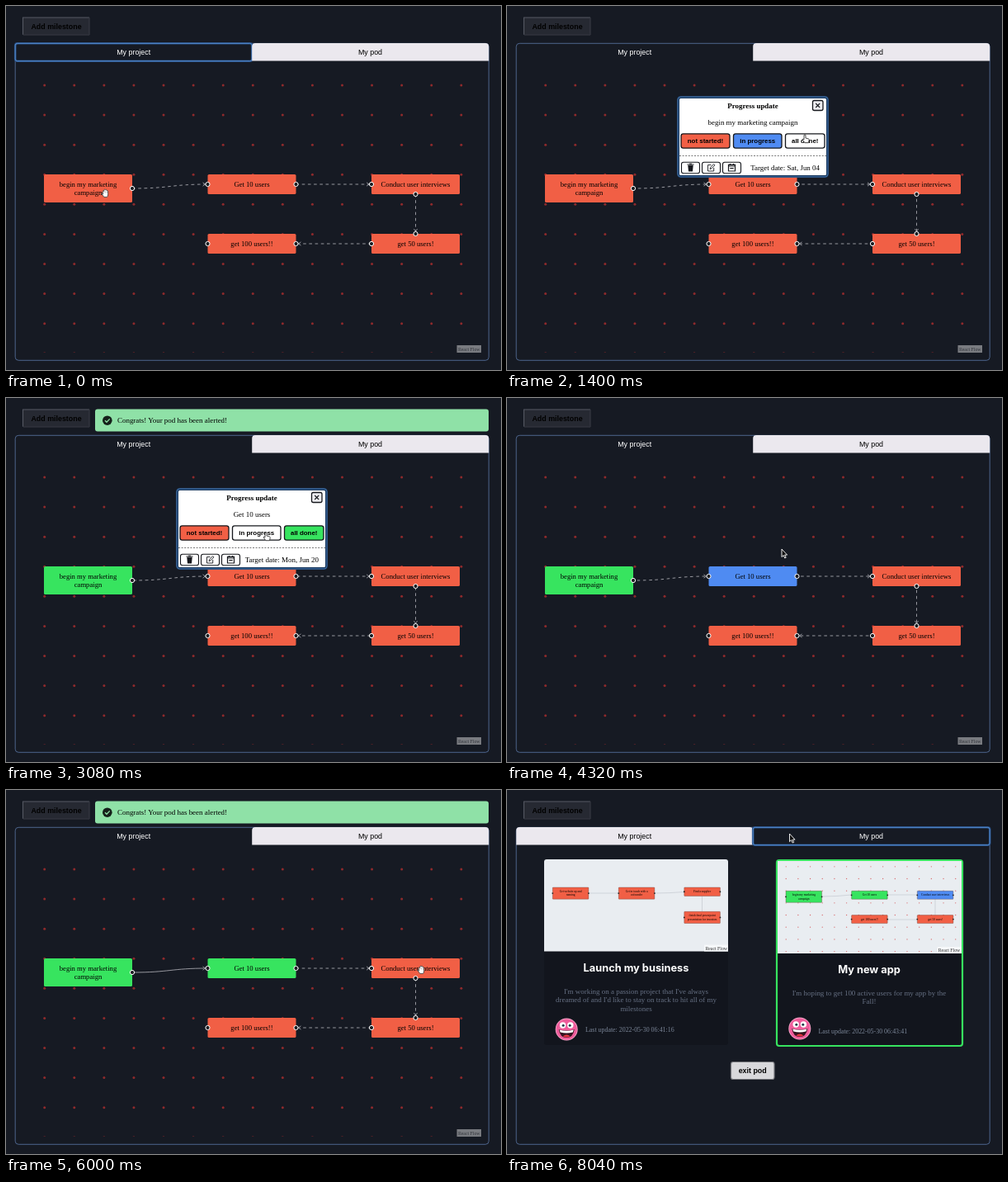
These frames come from a looping animation (600 px wide and 441 px high, 8080 ms). An HTML page:

```html
<!DOCTYPE html>
<html lang="en">
<head>
<meta charset="utf-8">
<title>Milestones</title>
<style>
  html, body { margin: 0; width: 100%; height: 100%; overflow: hidden; background: #161a23; }
  svg { display: block; width: 600px; height: 441px; }
  text { font-family: "Liberation Serif", "Times New Roman", serif; font-size: 8.95px; white-space: pre; }
  .ui { font-family: "Liberation Sans", Arial, sans-serif; font-size: 8.9px; }
  .bold { font-weight: 700; }
  .mid { text-anchor: middle; }
  .end { text-anchor: end; }
  .small { font-size: 7.9px; }
  .label { font-size: 8.65px; }
  .head { font: 700 12.8px Inter, sans-serif; fill: #fff; }
  .tiny { font-size: 3.5px; }
  .credit { font-size: 5.8px; }
  .dim { fill: #667083; }
</style>
</head>
<body>
<svg id="stage" viewBox="0 0 600 441" xmlns="http://www.w3.org/2000/svg"></svg>
<script>
const LOOP = 8080;
const RED = '#f15f45', GREEN = '#37e45f', BLUE = '#4f8bf2', LIGHT = '#ebe8ee';

const text = (x, y, s, cls = '', fill = '#000', id = '') =>
  `<text x="${x}" y="${y}" class="${cls}" fill="${fill}" id="${id}">${s}</text>`;
const rect = (x, y, w, h, fill, extra = '') =>
  `<rect x="${x}" y="${y}" width="${w}" height="${h}" fill="${fill}" ${extra}/>`;
const circle = (x, y, r, fill, extra = '') =>
  `<circle cx="${x}" cy="${y}" r="${r}" fill="${fill}" ${extra}/>`;
const path = (d, extra = '') => `<path d="${d}" ${extra}/>`;
const group = (id, body, extra = '') => `<g id="${id}" ${extra}>${body}</g>`;
const line = (color, width = 1) => `fill="none" stroke="${color}" stroke-width="${width}"`;

const NODES = [
  { x: 46, y: 204, h: 34, lines: ['begin my marketing', 'campaign'] },
  { x: 244.5, y: 204, h: 24, lines: ['Get 10 users'] },
  { x: 443, y: 204, h: 24, lines: ['Conduct user interviews'] },
  { x: 443, y: 276, h: 24, lines: ['get 50 users!'] },
  { x: 244.5, y: 276, h: 24, lines: ['get 100 users!!'] }
];
const EDGES = [
  'M153 221C199 221 199 216 244.5 216', 'M351.5 216H443',
  'M496.5 228V276', 'M443 288H351.5'
];
const HANDLES = [[153, 221], [244.5, 216], [351.5, 216], [443, 216], [496.5, 228],
  [496.5, 276], [443, 288], [351.5, 288], [244.5, 288]];
const BUTTONS = [
  { x: 211, w: 59, label: 'not started!', color: RED },
  { x: 274.5, w: 58.5, label: 'in progress', color: BLUE },
  { x: 337.5, w: 47.5, label: 'all done!', color: GREEN }
];

function dots(x0, y0, cols, rows, gap, r, color) {
  let s = '';
  for (let j = 0; j < rows; j++)
    for (let i = 0; i < cols; i++)
      s += circle(x0 + gap * i, y0 + gap * j, r, color);
  return s;
}

function tab(id, x, label, cx) {
  const d = `M${x} 66.5V49q0-4 4-4h279q4 0 4 4V66.5Z`;
  return path(d, `id="${id}Fill" fill="${LIGHT}"`) +
    text(cx, 59, label, 'ui mid', '#fff', id + 'Text') +
    group(id + 'Ring', `<rect x="${x}" y="45.3" width="287" height="21.4" rx="2.5" ${line('#274d80', 2.6)}/>` +
      `<rect x="${x}" y="45.3" width="287" height="21.4" rx="2.5" ${line('#5b93d8', .9)}/>`);
}

function board() {
  let s = dots(46.7, 96, 15, 9, 36.08, 1.5, '#8f2a2c');
  for (let i = 0; i < 15; i++) s += rect(45.6 + 36.08 * i, 419, 2.2, 1, '#4a2026');
  EDGES.forEach((d, i) => s += path(d, `id="edge${i}" ${line('#b6b7bd', .8)}`));
  s += path('M238.5 213.8l3 2.2-3 2.2M437 213.8l3 2.2-3 2.2M494.3 270l2.2 3 2.2-3M357.5 285.8l-3 2.2 3 2.2', line('#b6b7bd', .7));
  NODES.forEach((n, i) => {
    s += rect(n.x, n.y, 107, n.h, RED, `rx="1.6" id="node${i}"`);
    n.lines.forEach((l, k) => s += text(n.x + 53.5, n.y + 15 + 10.4 * k, l, 'label mid'));
  });
  HANDLES.forEach(([x, y]) => s += circle(x, y, 2.6, '#1b1c20', 'stroke="#fff" stroke-width="1"'));
  return s + rect(546.5, 411, 29.5, 9, '#797b80') + text(561.2, 417.6, 'React Flow', 'credit mid', '#33363c');
}

function popup() {
  const ink = '#16181d';
  let s = rect(207.5, 110.5, 181, 96, '#fff', 'rx="3" stroke="#1d3d63" stroke-width="3"') +
    `<rect x="207" y="110" width="182" height="97" rx="3.5" ${line('#4c7db8', .8)}/>` +
    text(298, 124, 'Progress update', 'bold mid') + text(298, 143.5, '', 'mid', '#000', 'task') +
    rect(370.5, 114.5, 12.5, 12, '#ededf0', `rx="2" stroke="${ink}" stroke-width="1.3"`) +
    path('M374.2 118l5 5m0-5l-5 5', line(ink, 1.1));
  BUTTONS.forEach((b, i) => s += rect(b.x, 154.8, b.w, 17.4, b.color, `rx="2.6" stroke="${ink}" stroke-width="1.3" id="btn${i}"`) +
    text(b.x + b.w / 2, 166.3, b.label, 'ui small bold mid'));
  s += path('M209 181.5H387', line('#555', .8) + ' stroke-dasharray="2 1.6"');
  [211.5, 236.5, 261.5].forEach(x => s += rect(x, 189.3, 22, 13.4, '#fff', `rx="2.5" stroke="${ink}" stroke-width="1.1"`));
  s += path('M219.3 193h6.4l-.7 7.5h-5zM218.5 191.6h8v1h-8zM221 190.8h3v1h-3z', `fill="${ink}"`) +
    path('M247.5 192.6h-4v7.4h7.2v-4M246 197.6l.6-2 4-4 1.3 1.3-4 4z', line(ink, .9)) +
    path('M268.5 192.4h8v7.6h-8zM268.5 194h8M270.5 191v2M274.5 191v2', line(ink, 1.2)) +
    rect(270.3, 196, 4.4, 1.2, ink);
  return s + text(379, 198.8, '', 'end', '#000', 'due');
}

function avatar(x, y) {
  return group('', circle(0, 0, 13.5, '#f7a5c9') + circle(0, 0, 12.6, '#ef5c9b') +
    circle(-4.6, -5, 3.7, '#fff') + circle(4.6, -5, 3.7, '#fff') +
    circle(-4, -4.8, 1.5, '#243a4a') + circle(4, -4.8, 1.5, '#243a4a') +
    path('M-9.5 0Q0 3 9.5 0Q8 10 0 10Q-8 10-9.5 0Z', 'fill="#35141f"') +
    path('M-8.6 .4Q0 3 8.6 .4L7.6 3.4Q0 5.4-7.6 3.4Z', 'fill="#fff"') +
    path('M-4.5 8.5Q0 4.6 4.5 8.5Q0 10.6-4.5 8.5Z', 'fill="#e5353f"'),
    `transform="translate(${x} ${y})"`);
}

function mini(x, y, h, color, lines) {
  const top = y + h / 2 + 1.1 - (lines.length - 1) * 2.1;
  return rect(x, y, 43.6, h, color, 'rx=".6" stroke="#5a3430" stroke-width=".35"') +
    lines.map((l, k) => text(x + 21.8, top + 4.2 * k, l, 'tiny mid')).join('') +
    circle(x, y + h / 2, .9, '#222') + circle(x + 43.6, y + h / 2, .9, '#222');
}

function card(x, y, title, about, stamp) {
  return text(x + 111.5, y + 136, title, 'head mid') +
    about.map((l, k) => text(x + 111.5, y + 163 + 10.4 * k, l, 'mid dim')).join('') +
    text(x + 50, y + 209, 'Last update: ' + stamp, 'small', '#7b8698');
}

function pod() {
  const thin = line('#a8adb5', .4);
  return rect(45, 84, 223, 225, '#12151d', 'rx="3"') +
    path('M45 195.5V87q0-3 3-3h217q3 0 3 3V195.5Z', 'fill="#e9edf1"') +
    path('M99 125H135M179 125Q197 125 214.5 123.5M236.5 128.5V147', thin) +
    mini(55.3, 118, 14.2, RED, ['Get website up and', 'running']) +
    mini(135.3, 118, 14.2, RED, ['Get in touch with a', 'cofounder']) +
    mini(214.8, 118, 10.5, RED, ['Find a supplier']) +
    mini(214.8, 147.3, 14.2, RED, ['finish final powerpoint', 'presentation for investors']) +
    rect(239, 187.5, 29, 8, '#f6f8fa') + text(253.7, 193.8, 'React Flow', 'credit mid', '#333') +
    card(45, 84, 'Launch my business', ["I'm working on a passion project that I've always",
      "dreamed of and I'd like to stay on track to hit all of my", 'milestones'], '2022-05-30 06:41:16') +
    avatar(72.2, 290) +
    rect(327, 85, 225, 225, '#12151d', `rx="3" stroke="${GREEN}" stroke-width="2.2"`) +
    rect(328, 86, 223, 112, '#e9edf1') +
    dots(338.2, 92.8, 15, 8, 14.68, .65, '#d8696b') +
    path('M381.6 129Q400 129 417.6 127M461 127H497M519 132V152M497 157H461', thin) +
    mini(338, 122.3, 14, GREEN, ['begin my marketing', 'campaign']) +
    mini(417.6, 122.3, 10, GREEN, ['Get 10 users']) +
    mini(497.3, 122.3, 10, BLUE, ['Conduct user interviews']) +
    mini(417.6, 151.6, 10, RED, ['get 100 users!!']) +
    mini(497.3, 151.6, 10, RED, ['get 50 users!']) +
    rect(521.5, 190, 29, 8, '#f6f8fa') + text(536, 196.2, 'React Flow', 'credit mid', '#333') +
    card(327.5, 86, 'My new app', ["I'm hoping to get 100 active users for my app by the", 'Fall!'], '2022-05-30 06:43:41') +
    avatar(354.8, 289) +
    rect(271.5, 329.5, 52.5, 21, '#d8d8db', 'rx="2.5" stroke="#77787d" stroke-width="1.2"') +
    text(297.7, 343.3, 'exit pod', 'ui bold mid');
}

const cursors =
  group('arrow', path('M0 0V9.6L2.2 7.6L3.7 11L5.2 10.3L3.7 7.1H6.6Z', 'fill="#111" stroke="#fff" stroke-width=".9"')) +
  group('point', path('M-1 1q0-1.3 1-1.3t1 1.3v3l3.4.9q1 .3.8 1.6l-.7 3.2h-4.6l-2.6-3.6q-.4-1.2.8-1l.9.7z', 'fill="#fff" stroke="#222" stroke-width=".8"')) +
  group('grab', path('M-2.6 6.2L-2.8 2.4q.8-1.2 1.5 0l.2-1.6q.8-1.2 1.6 0q.9-1 1.6.2l.1.8q1-.6 1.5.4v3.6q0 2.8-1.2 3.6h-3.8q-1-1.8-2.9-3.8q-.2-1.4 1.6-.6z', 'fill="#fff" stroke="#333" stroke-width=".8"') +
    path('M-.9 2.4v2M.7 2.4v2M2.3 2.6v2', line('#666', .4)));

document.getElementById('stage').innerHTML =
  rect(0, 0, 600, 441, '#161a23') +
  rect(20.5, 13.8, 80.5, 21, '#262932', 'rx="2.5"') +
  path('M20.5 34.8V14H101', line('#555863', 1.1)) + path('M21 35H101V14', line('#3a3d46', 1)) +
  text(61, 27.8, 'Add milestone', 'ui bold mid') +
  `<rect x="11.2" y="45.3" width="574" height="384" rx="4" ${line('#4d658c', 1)}/>` +
  tab('left', 11.2, 'My project', 154.7) + tab('right', 298.2, 'My pod', 441.5) +
  group('board', board()) + group('pod', pod()) + group('popup', popup()) +
  group('toast', rect(108, 13.5, 477, 27, '#8fe1a7', 'rx="3"') + circle(122.8, 27.2, 5.8, '#15201a') +
    path('M120 27.3l2 2 3.7-3.9', line('#8fe1a7', 1.3)) + text(135, 30.2, 'Congrats! Your pod has been alerted!')) +
  group('cursor', cursors);

const $ = id => document.getElementById(id);
const show = (id, on) => $(id).style.display = on ? '' : 'none';
const fill = (id, color) => $(id).setAttribute('fill', color);

// Pointer tip: time, x, y
const MOVES = [
  [0, 120, 222], [560, 121, 222], [1200, 358, 157], [1400, 361, 156], [1640, 361, 157],
  [2160, 300, 214], [2560, 300, 214], [2960, 315, 162], [3080, 315, 163], [3400, 315, 163],
  [3900, 333, 183], [4400, 333, 183], [4680, 312, 212], [4840, 312, 212], [5280, 361, 159],
  [5560, 361, 159], [5920, 503, 213], [6280, 503, 213], [6660, 310, 161], [6900, 310, 161],
  [7160, 343, 140], [7280, 343, 140], [7640, 342.5, 53], [8080, 342.5, 53]
];
// Dialog: opening time, closing time, node, due date
const DIALOGS = [
  [480, 1600, 0, 'Sat, Jun 04'], [2480, 3320, 1, 'Mon, Jun 20'],
  [4780, 5480, 1, 'Mon, Jun 20'], [6220, 6860, 2, 'Fri, Jul 01']
];
const TOASTS = [[1600, 3520], [5480, 7400]];
const POD_AT = 7880;

function tip(t) {
  const i = Math.max(1, MOVES.findIndex(m => m[0] > t));
  const [t0, x0, y0] = MOVES[i - 1], [t1, x1, y1] = MOVES[i];
  const k = (t - t0) / (t1 - t0), e = k * k * (3 - 2 * k);
  return [x0 + (x1 - x0) * e, y0 + (y1 - y0) * e];
}
const inside = (x, y, bx, by, w, h) => x >= bx && x <= bx + w && y >= by && y <= by + h;

function setTab(id, active, ring) {
  fill(id + 'Fill', active ? 'none' : LIGHT);
  fill(id + 'Text', active ? '#fff' : '#000');
  show(id + 'Ring', ring);
}

function draw(t) {
  const inPod = t >= POD_AT;
  setTab('left', !inPod, t < 480);
  setTab('right', inPod, inPod);
  show('board', !inPod);
  show('pod', inPod);
  show('toast', TOASTS.some(([a, b]) => t >= a && t < b));

  fill('node0', t < 1600 ? RED : GREEN);
  fill('node1', t < 3320 ? RED : t < 5480 ? BLUE : GREEN);
  fill('node2', t < 6860 ? RED : BLUE);
  EDGES.forEach((_, i) => {
    const solid = i === 0 && t >= 5480;
    $('edge' + i).setAttribute('stroke-dasharray', solid ? 'none' : '3.6 3.6');
    $('edge' + i).setAttribute('stroke-dashoffset', -7.2 * (t % 500) / 500);
  });

  const [x, y] = tip(t);
  const dialog = DIALOGS.find(([a, b]) => t >= a && t < b);
  let kind = 'arrow';
  show('popup', !!dialog);
  if (dialog) {
    $('task').textContent = NODES[dialog[2]].lines.join(' ');
    $('due').textContent = 'Target date: ' + dialog[3];
    BUTTONS.forEach((b, i) => {
      const over = inside(x, y, b.x, 154.8, b.w, 17.4);
      fill('btn' + i, over ? '#fff' : b.color);
      if (over) kind = 'point';
    });
  }
  const overDialog = dialog && inside(x, y, 207, 110, 182, 97);
  if (!inPod && !overDialog && NODES.some(n => inside(x, y, n.x, n.y, 107, n.h))) kind = 'grab';
  ['arrow', 'point', 'grab'].forEach(c => show(c, c === kind));
  $('cursor').setAttribute('transform', `translate(${x} ${y})`);
}

const start = performance.now();
function tick() {
  draw((performance.now() - start) % LOOP);
  requestAnimationFrame(tick);
}
draw(0);
requestAnimationFrame(tick);
</script>
</body>
</html>
```
